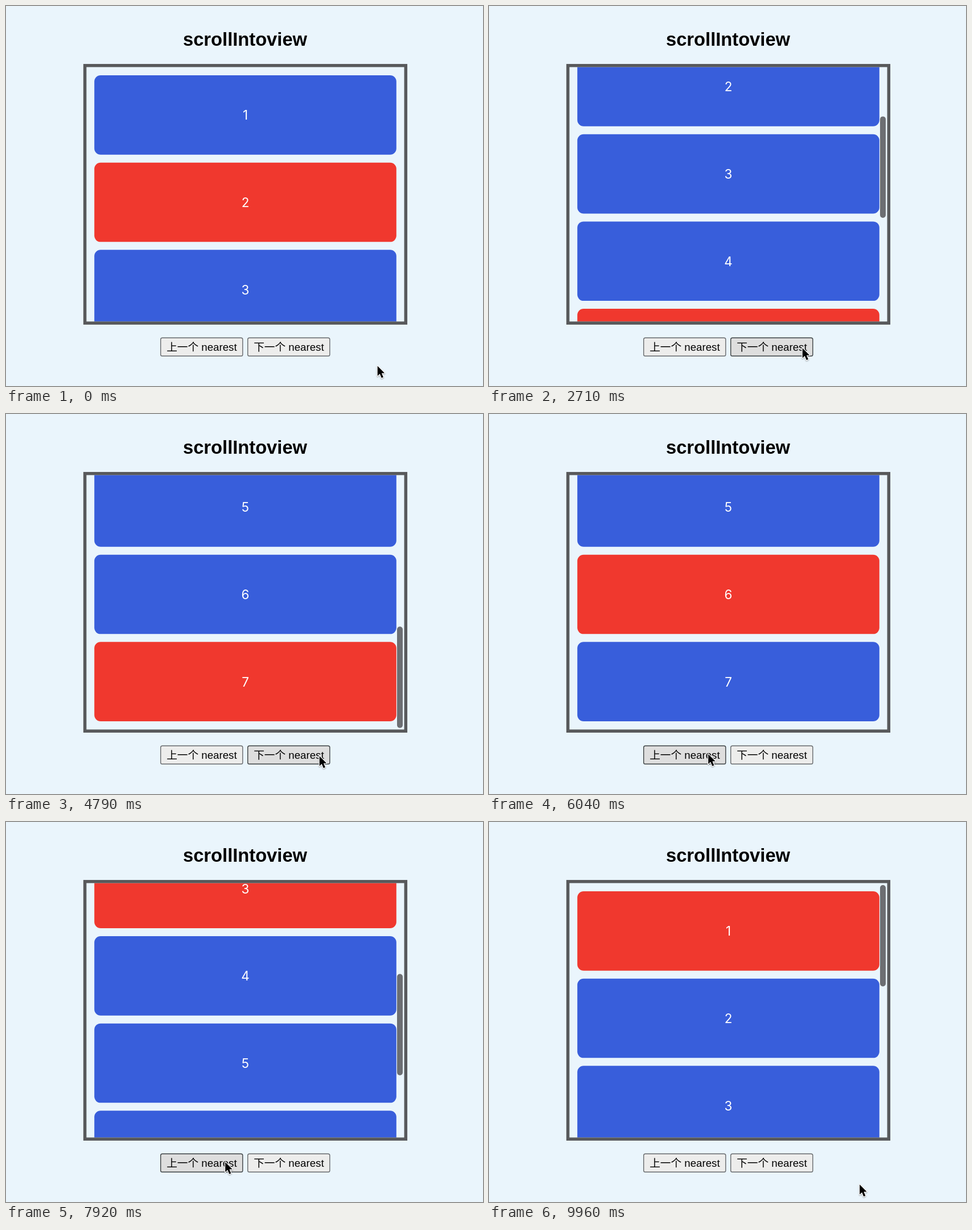
Write an HTML page with a canvas that moves like this. It is 838 px wide and 669 px high and loops after 10000 ms.

```html
<!DOCTYPE html>
<html lang="zh-CN">
<head>
<meta charset="utf-8">
<title>scrollIntoview</title>
<style>
html, body { margin: 0; width: 100%; height: 100%; overflow: hidden; background: #eaf5fc; }
canvas { display: block; width: 838px; height: 669px; }
</style>
</head>
<body>
<canvas id="stage"></canvas>
<script>
const W = 838, H = 669, LOOP = 10000;
const BG = '#eaf5fc', BLUE = '#385edb', RED = '#f0382e', FRAME = '#58595b';
const PITCH = 153.67, COUNT = 7;

const canvas = document.getElementById('stage');
const ctx = canvas.getContext('2d');
const ratio = window.devicePixelRatio || 1;
canvas.width = W * ratio;
canvas.height = H * ratio;

const buttons = [
  { x: 271, label: '上一个 nearest' },
  { x: 424, label: '下一个 nearest' }
];

// Each click selects an item and scrolls smoothly: time, item, scroll end, duration
const clicks = [
  [1150, 3, 28, 300],
  [1810, 4, 28 + PITCH, 450],
  [2600, 5, 28 + PITCH * 2, 450],
  [3380, 6, 28 + PITCH * 3, 450],
  [4180, 7, 28 + PITCH * 4, 450],
  [5920, 6, 28 + PITCH * 4, 0],
  [6450, 5, PITCH * 4, 300],
  [7050, 4, PITCH * 3, 450],
  [7692, 3, PITCH * 2, 450],
  [8420, 2, PITCH, 450],
  [9210, 1, 0, 450]
];

// Pointer moves: start, end, x, y reached
const moves = [
  [20, 960, 549.5, 600.5],
  [4790, 5720, 384, 597],
  [9850, 9960, 650, 636.5]
];

const clamp = v => Math.max(0, Math.min(1, v));
const mix = (a, b, p) => a + (b - a) * p;
const ease = p => (1 - Math.cos(Math.PI * clamp(p))) / 2;

function stateAt(t) {
  let active = 2, scroll = 0;
  for (const [start, item, end, span] of clicks) {
    if (t < start) break;
    active = item;
    scroll = mix(scroll, end, span ? ease((t - start) / span) : 1);
  }
  return { active, scroll };
}

function pointerAt(t) {
  let x = 651.5, y = 632;
  for (const [start, end, toX, toY] of moves) {
    const p = ease((t - start) / (end - start));
    x = mix(x, toX, p);
    y = mix(y, toY, p);
  }
  return { x, y };
}

function barAlpha(t) {
  if (t < 1150) return 0;
  if (t < 6450) return 1 - clamp((t - 5150) / 250);
  return 1;
}

function round(x, y, w, h, r, fill) {
  ctx.beginPath();
  ctx.roundRect(x, y, w, h, r);
  ctx.fillStyle = fill;
  ctx.fill();
}

function text(str, x, y, font, fill) {
  ctx.font = font;
  ctx.fillStyle = fill;
  ctx.textAlign = 'center';
  ctx.textBaseline = 'alphabetic';
  ctx.fillText(str, x, y);
}

function drawList(t) {
  const { active, scroll } = stateAt(t);
  ctx.save();
  ctx.beginPath();
  ctx.rect(141.3, 107.5, 558.4, 448);
  ctx.clip();
  for (let n = 1; n <= COUNT; n++) {
    const y = 122 + (n - 1) * PITCH - scroll;
    if (y > 556 || y < -40) continue;
    round(155.2, y, 530.6, 139.7, 11, n === active ? RED : BLUE);
    text(n, 420.5, y + 78.2, '22.4px Inter, "Liberation Sans", sans-serif', '#fff');
  }
  ctx.globalAlpha = barAlpha(t);
  round(687, 111 + scroll * 0.4095, 10, 178.5, 5, '#6c6e72');
  ctx.restore();
  ctx.strokeStyle = FRAME;
  ctx.lineWidth = 5.5;
  ctx.strokeRect(138.6, 104.8, 563.7, 453.4);
}

function drawButton({ x, label }, pointer) {
  const hover = pointer.x >= x && pointer.x <= x + 145.5 &&
    pointer.y >= 583.5 && pointer.y <= 617;
  round(x, 583.5, 145.5, 33.5, 3.5, hover ? '#3c4143' : '#66696c');
  round(x + 1.4, 584.9, 142.7, 30.7, 2.2, hover ? '#dedede' : '#ededec');
  text(label, x + 72.9, 607,
    '18.67px "Liberation Sans", "Noto Sans CJK SC", "Noto Sans CJK", sans-serif', '#000');
}

function drawPointer({ x, y }) {
  ctx.save();
  ctx.translate(x + 1.2, y + 1.8);
  ctx.beginPath();
  ctx.moveTo(0, 0);
  for (const [px, py] of [[0, 17.5], [4, 13.8], [7, 21], [10.2, 19.6], [7.2, 12.7], [12.4, 12.4]]) {
    ctx.lineTo(px, py);
  }
  ctx.closePath();
  ctx.lineJoin = 'round';
  ctx.lineWidth = 2.6;
  ctx.strokeStyle = '#fff';
  ctx.shadowColor = 'rgba(0,0,0,0.35)';
  ctx.shadowBlur = 2 * ratio;
  ctx.shadowOffsetY = ratio;
  ctx.stroke();
  ctx.shadowColor = 'transparent';
  ctx.fillStyle = '#000';
  ctx.fill();
  ctx.restore();
}

function draw(t) {
  ctx.setTransform(ratio, 0, 0, ratio, 0, 0);
  ctx.fillStyle = BG;
  ctx.fillRect(0, 0, W, H);
  text('scrollIntoview', 420, 69.5, 'bold 32.7px "Liberation Sans", Arial, sans-serif', '#000');
  drawList(t);
  const pointer = pointerAt(t);
  for (const b of buttons) drawButton(b, pointer);
  drawPointer(pointer);
}

const begin = performance.now();
function tick() {
  draw((performance.now() - begin) % LOOP);
  requestAnimationFrame(tick);
}
tick();
</script>
</body>
</html>
```
